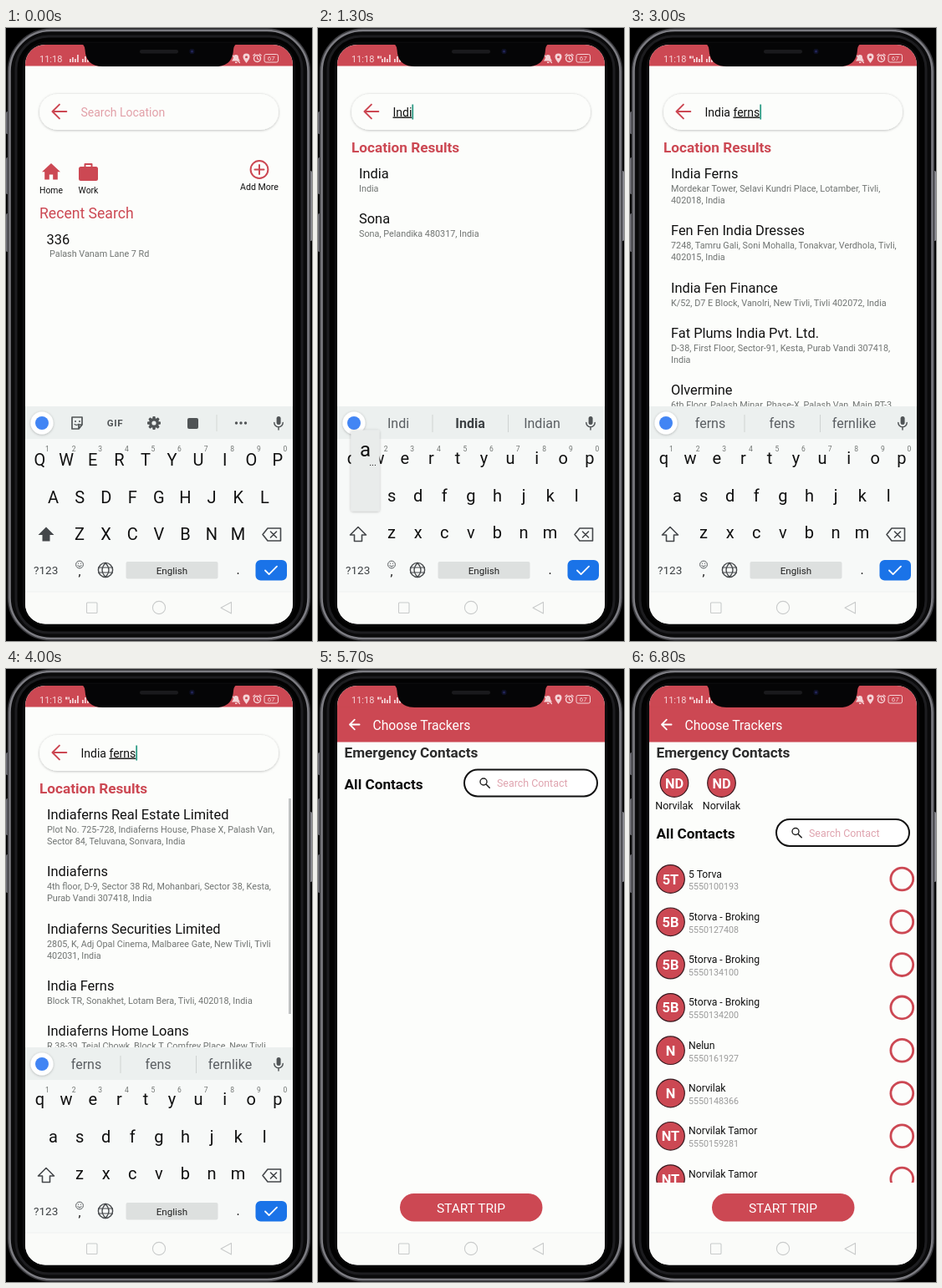
An HTML page for the animation above (6.9 s loop, 366 by 734 pixels).

```html
<!DOCTYPE html>
<html lang="en">
<head>
<meta charset="utf-8">
<title>Location search</title>
<style>
html, body { margin: 0; width: 100%; height: 100%; overflow: hidden; background: #000; }
svg { display: block; width: 366px; height: 734px; font-family: Roboto, Arial, sans-serif; }
#typed { white-space: pre; }
.u { text-decoration: underline; }
.line { fill: none; stroke-linecap: round; stroke-linejoin: round; }
</style>
</head>
<body>
<svg id="stage" viewBox="0 0 366 734"></svg>
<script>
const LOOP = 6900, STEP = 100;
const RED = '#cc4853', INK = '#111', GREY = '#707472', PAPER = '#fcfdfb', ICON = '#505456';

// Markup helpers
const txt = (x, y, s, size, c = INK, more = '') =>
  `<text x="${x}" y="${y}" font-size="${size}" fill="${c}" ${more}>${s}</text>`;
const mid = (x, y, s, size, c, more = '') => txt(x, y, s, size, c, `text-anchor="middle" ${more}`);
const bold = (x, y, s, size, c) => txt(x, y, s, size, c, 'font-weight="700"');
const box = (x, y, w, h, r, c, more = '') =>
  `<rect x="${x}" y="${y}" width="${w}" height="${h}" rx="${r}" fill="${c}" ${more}/>`;
const dot = (x, y, r, c, more = '') => `<circle cx="${x}" cy="${y}" r="${r}" fill="${c}" ${more}/>`;
const ring = (x, y, r, c, w) => dot(x, y, r, 'none', `stroke="${c}" stroke-width="${w}"`);
const line = (d, c, w, more = '') => `<path class="line" d="${d}" stroke="${c}" stroke-width="${w}" ${more}/>`;
const fill = (d, c) => `<path d="${d}" fill="${c}"/>`;
const group = (id, body, more = '') => `<g id="${id}" ${more}>${body}</g>`;
const $ = id => document.getElementById(id);

// Places: [title, address line, second line]
const nearby = [
  ['India', 'India'],
  ['Sona', 'Sona, Pelandika 480317, India']
];
const firstHits = [
  ['India Ferns', 'Mordekar Tower, Selavi Kundri Place, Lotamber, Tivli,', '402018, India'],
  ['Fen Fen India Dresses', '7248, Tamru Gali, Soni Mohalla, Tonakvar, Verdhola, Tivli,', '402015, India'],
  ['India Fen Finance', 'K/52, D7 E Block, Vanolri, New Tivli, Tivli 402072, India'],
  ['Fat Plums India Pvt. Ltd.', 'D-38, First Floor, Sector-91, Kesta, Purab Vandi 307418,', 'India'],
  ['Olvermine', '6th Floor, Palash Minar, Phase-X, Palash Van, Main RT-3,']
];
const finalHits = [
  ['Indiaferns Real Estate Limited', 'Plot No. 725-728, Indiaferns House, Phase X, Palash Van,', 'Sector 84, Teluvana, Sonvara, India'],
  ['Indiaferns', '4th floor, D-9, Sector 38 Rd, Mohanbari, Sector 38, Kesta,', 'Purab Vandi 307418, India'],
  ['Indiaferns Securities Limited', '2805, K, Adj Opal Cinema, Malbaree Gate, New Tivli, Tivli', '402031, India'],
  ['India Ferns', 'Block TR, Sonakhet, Lotam Bera, Tivli, 402018, India'],
  ['Indiaferns Home Loans', 'R 38-39, Tejal Chowk, Block T, Comfrey Place, New Tivli,']
];

// Contacts: [initials, name, number]
const contacts = [
  ['5T', '5 Torva', '5550100193'],
  ['5B', '5torva - Broking', '5550127408'],
  ['5B', '5torva - Broking', '5550134100'],
  ['5B', '5torva - Broking', '5550134200'],
  ['N', 'Nelun', '5550161927'],
  ['N', 'Norvilak', '5550148366'],
  ['NT', 'Norvilak Tamor', '5550159281'],
  ['NT', 'Norvilak Tamor', '5550172604']
];

// Keystrokes: [character, press, release]
const strokes = [
  ['I', 400, 500], ['n', 600, 700], ['d', 800, 900], ['i', 1000, 1100], ['a', 1200, 1400],
  [' ', 1400, 1600], ['f', 1700, 1800], ['e', 1900, 2000], ['r', 2100, 2200],
  ['n', 2300, 2400], ['s', 2500, 2600]
];
const hints = ['I It In', 'In Is Inn', 'Ind India Indian', 'Indi India Indian', 'India Indian Indies',
  'and is has', 'f for from', 'fe few feel', 'fer for fern', 'fern fen ferns', 'ferns fens fernlike']
  .map(s => s.split(' '));

// Keyboard
const rows = [
  { keys: 'qwertyuiop', x: 40.5, y: 524 },
  { keys: 'asdfghjkl', x: 56.5, y: 568.5 },
  { keys: 'zxcvbnm', x: 88, y: 613.3 }
];
const PITCH = 31.6;

const letters = caps => rows.map(r => [...r.keys].map((k, i) =>
  mid(r.x + i * PITCH, r.y - (caps ? 0 : 2), caps ? k.toUpperCase() : k, 20, INK)).join('')).join('');

function popup(ch) {
  const k = ch.toLowerCase(), r = rows.find(r => r.keys.includes(k));
  const x = r.x + r.keys.indexOf(k) * PITCH;
  return box(x - 17, r.y - 87, 34, 97, 2, '#e9eceb', 'filter="url(#soft)"') +
    mid(x, r.y - 56, ch, 24, INK) + mid(x + 9, r.y - 45, '...', 11, INK);
}

const gear = Array.from({ length: 8 }, (_, i) =>
  box(175.3, 465, 3.4, 4, 1, ICON, `transform="rotate(${i * 45} 177 473)"`)).join('') +
  ring(177, 473, 4.3, ICON, 3.4);

const tools =
  line('M79 466h12v9l-4 5h-8zM87 480v-5h4', ICON, 1.7) + dot(83, 471, 1, ICON) + dot(88, 471, 1, ICON) +
  line('M82 474.5q3 2 5-.3', ICON, 1.2) +
  mid(130.5, 477, 'GIF', 11.5, ICON, 'font-weight="700" letter-spacing=".6"') + gear +
  box(217, 467, 13, 13, 2, ICON) + box(251.5, 463, 1, 20, 0, '#d3d7d6') +
  [275.5, 281, 286.5].map(x => dot(x, 473, 1.7, ICON)).join('');

const shiftPath = 'M48 597.5l-9.5 9.5h5v7.500h9v-7.500h5z';
const keyboard =
  box(23, 453, 320, 222, 0, '#f7f9f8') + box(23, 453, 320, 39, 0, '#ecf0ef') +
  dot(43, 473, 13.5, '#fff', 'filter="url(#soft)"') + dot(43, 473, 8, '#4285f4') +
  group('tools', tools) + group('hints', '') +
  box(323.6, 465, 5, 10, 2.5, ICON) + line('M320.8 472.5a5.2 5.2 0 0 0 10.4 0M326 478v3', ICON, 1.5) +
  group('caps', letters(true) + fill(shiftPath, '#44474a')) +
  group('lower', letters(false) + line(shiftPath, '#44474a', 1.6)) +
  [...'1234567890'].map((n, i) => mid(49.5 + i * PITCH, 507, n, 8.5, GREY)).join('') +
  line('M313 599h15.500v15h-15.500l-6-7.500zM316.500 603l7 7M323.500 603l-7 7', '#44474a', 1.6) +
  txt(33, 654, '?123', 13.6, '#3c4043') +
  ring(88, 642.5, 4.4, '#55595c', 1) + line('M85.8 643.8q2.2 2.4 4.4 0M86.5 641v.3M89.5 641v.3', '#55595c', 1) +
  mid(88, 656, ',', 15, INK) +
  ring(119, 649, 8.6, '#44474a', 1.4) +
  line('M110.5 646h17M110.5 652h17M119 640.5q-8 8.5 0 17q8-8.5 0-17', '#44474a', 1.2) +
  `<rect id="space" x="143.5" y="639" width="110" height="20.5" rx="2" fill="#dde0df"/>` +
  mid(198.5, 653.5, 'English', 11.6, '#222') + mid(277.5, 654, '.', 16, INK) +
  box(298.5, 637, 37.5, 24.5, 6, '#1a73e8') + line('M310 649.5l4.6 4.6l9.4-9.4', '#fff', 1.8) +
  group('popup', '');

// Search page
const backArrow = (x, y, r, c, w) => line(`M${x + 2 * r} ${y}H${x}M${x + r} ${y - r}L${x} ${y}l${r} ${r}`, c, w);

const recent =
  fill('M54 162l-11 10.2h3.2v9.3h5.6v-6h4.4v6h5.6v-9.3h3.2z', RED) +
  box(87, 166, 23, 17, 2.5, RED) + line('M94.5 166v-3h8v3', RED, 2) +
  ring(303, 169.5, 10.4, RED, 2) + line('M297.5 169.5h11M303 164v11', RED, 2) +
  mid(54, 197.5, 'Home', 10.4, INK) + mid(98.5, 197.5, 'Work', 10.4, INK) + mid(303, 194, 'Add More', 10.6, INK) +
  txt(40, 227.5, 'Recent Search', 17.6, RED) +
  txt(48.5, 258.5, '336', 16.4) + txt(52, 274, 'Palash Vanam Lane 7 Rd', 10.8, GREY);

function results(list) {
  let y = 180, out = bold(40, 149, 'Location Results', 17.2, RED);
  for (const [title, ...lines] of list) {
    out += txt(49, y, title, 16.4) + lines.map((s, i) => txt(49, y + 16 + i * 14, s, 10.8, GREY)).join('');
    y += 40 + 14.2 * lines.length;
  }
  return out;
}

const searchPage =
  box(23, 45, 320, 630, 0, PAPER) +
  box(40, 79, 286, 43, 21.5, PAPER, 'filter="url(#soft)"') + backArrow(55.5, 100, 8.4, RED, 2) +
  group('blank', txt(89.5, 105.5, 'Search Location', 14, '#e2a0a8')) +
  `<text id="typed" x="89.5" y="105.5" font-size="14" fill="${INK}"></text>` +
  `<rect id="caret" y="91.5" width="1.8" height="18" fill="#2f9c86"/>` +
  group('recent', recent) + group('nearby', results(nearby)) +
  group('firstHits', results(firstHits)) + group('finalHits', results(finalHits)) +
  `<rect id="bar" x="338" y="155" width="3" height="258" fill="#c2c4c4"/>`;

// Contacts page
const avatar = (x, y, s) => dot(x, y, 16.8, RED, 'stroke="#3a1a20" stroke-width="1.2"') +
  mid(x, y + 6, s, 16.4, '#fff', 'font-weight="700"');

const contactRow = ([tag, name, number], i) => {
  const y = 251.5 + i * 51.3;
  return avatar(48.5, y, tag) + txt(70, y - 2, name, 12.2) + txt(70, y + 12.8, number, 10.7, '#9a9a9a') +
    ring(325.3, y, 13.4, RED, 2.8);
};

const contactPage =
  group('body',
    box(23, 45, 320, 640, 0, PAPER) +
    bold(31.5, 106, 'Emergency Contacts', 17.2, '#2b2b2b') +
    group('finder', bold(31.5, 143.5, 'All Contacts', 17.2, '#0c0c0c') +
      box(175, 120.5, 159, 32, 16, '#fff', 'stroke="#111" stroke-width="2"') +
      ring(198, 135, 4, '#222', 1.4) + line('M201 138l4.2 4.2', '#222', 1.6) +
      txt(214, 141, 'Search Contact', 12.4, '#dfa3ae')) +
    group('people',
      [53, 109.5].map(x => avatar(x, 136.5, 'ND') + mid(x, 168, 'Norvilak', 12.4)).join('') +
      `<g clip-path="url(#listClip)">${contacts.map(contactRow).join('')}</g>`) +
    box(98, 628, 170.5, 33.5, 16.7, RED) + mid(183, 650.8, 'START TRIP', 15.5, '#fff')) +
  group('header', box(23, 45, 320, 42.5, 0, RED) + backArrow(38, 66.5, 5.8, '#fff', 1.8) +
    txt(65.5, 72.8, 'Choose Trackers', 15.7, '#fff'));

// Phone
const pale = '#f5d3d6';
const status =
  box(23, 20, 320, 25.5, 0, RED) + txt(40, 40.5, '11:18', 11, pale) +
  group('tick', box(71, 33.5, 2.5, 3, 0, pale) + box(74.5, 33.5, 1.5, 3, 0, pale)) +
  [[76, 4], [79, 6], [82, 4], [85, 9], [91, 4], [94, 7], [97, 3]].map(([x, h]) => box(x, 41 - h, 1.8, h, 0, pale)).join('') +
  fill('M270 39.5q2-2 2-4.5a3 3 0 0 1 6 0q0 2.5 2 4.5zM274 40.5h2.5v1.5h-2.5z', pale) +
  line('M270 32l9.5 9.5', pale, 1.2) +
  fill('M287.5 42q-4-5-4-7.5a4 4 0 0 1 8 0q0 2.5-4 7.5z', pale) + dot(287.5, 34.8, 1.5, RED) +
  ring(300.5, 36.5, 4, pale, 1.5) + line('M300.5 34.5v2.3l1.7.9M295.8 32.8l2-1.6M305.2 32.8l-2-1.6', pale, 1.2) +
  box(309, 31.5, 16.5, 9.5, 2, 'none', `stroke="${pale}"`) + mid(317.2, 39.2, '67', 8, pale);

const nav = box(23, 675, 320, 40, 0, '#fafbf9') + box(23, 674.5, 320, 1, 0, '#f0f2f1') +
  box(96.5, 688, 12.5, 12.5, 1, 'none', 'stroke="#c9cbcb" stroke-width="1.1"') +
  ring(183, 694, 7.6, '#c9cbcb', 1.1) + line('M269.5 687.5v13.500l-12.500-6.750z', '#c9cbcb', 1.1);

const shell =
  [[100, 27], [155, 44], [222, 46]].map(([y, h]) => box(0, y, 4, h, 1.5, '#6d6d74')).join('') +
  box(362, 171, 4, 84, 1.5, '#8c8c93') +
  box(2.5, 1, 361, 732, 51, '#0a0a0b', 'stroke="#3c3c40" stroke-width="1.5"') +
  box(4.5, 3, 357, 728, 49, 'none', 'stroke="#7c7c82" stroke-width="2.6"') +
  box(12, 10, 342, 714, 39, '#020202', 'stroke="#1d1d20" stroke-width="3"') +
  box(19.5, 16.5, 327, 700, 30, '#0b0b0c');

const notch = fill('M88 18q6 1 6.5 8q1 20 21 20h135.500q20 0 21-20q.5-7 6.500-8z', '#050506') +
  box(160, 26, 46, 4.5, 2.2, '#1a1a1d') + dot(222.5, 28, 3.2, '#0d0f22') + dot(222.5, 28, 1.5, '#23265a');

$('stage').innerHTML = `<defs>
  <clipPath id="screenClip"><rect x="23" y="20" width="320" height="693.5" rx="24"/></clipPath>
  <clipPath id="workClip"><rect x="23" y="45" width="320" height="630"/></clipPath>
  <clipPath id="listClip"><rect x="23" y="220" width="320" height="395"/></clipPath>
  <filter id="soft" x="-20%" y="-30%" width="140%" height="160%">
    <feDropShadow dx="0" dy=".6" stdDeviation="1.6" flood-color="#000" flood-opacity=".28"/></filter>
  </defs>` + box(0, 0, 366, 734, 0, '#000') + shell +
  `<g clip-path="url(#screenClip)">${box(23, 20, 320, 694, 0, PAPER)}
    <g clip-path="url(#workClip)">${searchPage}${group('contactPage', contactPage)}${group('keyboard', keyboard)}</g>
    ${status}${nav}</g>` + notch;

// Motion
const OPEN = 4900, LOADED = 5900;
const pageSteps = [[4800, 60, 0], [4900, 26, .25], [5000, 7, .65], [5100, 2, 1], [5200, 0, 1]];
const keySteps = [[4900, 0], [5000, 1], [5100, 24], [5200, 110], [5300, 224]];

function at(steps, t, col) {
  const i = steps.findIndex(s => s[0] > t);
  if (i < 0) return steps[steps.length - 1][col];
  if (i === 0) return steps[0][col];
  const a = steps[i - 1], b = steps[i];
  return a[col] + (b[col] - a[col]) * (t - a[0]) / (b[0] - a[0]);
}
const show = (id, on) => $(id).setAttribute('display', on ? 'inline' : 'none');
const within = (t, a, b) => t >= a && t < b;
const move = (id, y) => $(id).setAttribute('transform', `translate(0 ${y})`);

function draw(t) {
  const done = strokes.filter(s => t >= s[2]).length;
  const pressed = strokes.find(s => within(t, s[1], s[2]));
  const text = t < OPEN ? strokes.slice(0, done).map(s => s[0]).join('') : '';
  const cut = text.lastIndexOf(' ') + 1;

  $('typed').innerHTML = text && `<tspan>${text.slice(0, cut)}</tspan><tspan class="u">${text.slice(cut)}</tspan>`;
  show('blank', !text);
  show('caret', text && !within(t, 3400, 3700) && !within(t, 4200, 4700));
  $('caret').setAttribute('x', 89.5 + $('typed').getComputedTextLength());

  show('tick', t >= 100);
  show('recent', t < 1000 || t >= OPEN);
  show('nearby', within(t, 1000, 3000));
  show('firstHits', within(t, 3000, 3600));
  show('finalHits', within(t, 3600, OPEN));
  $('bar').setAttribute('opacity', t < 3700 ? 0 : at([[4100, 1], [4400, 0]], t, 1));

  show('tools', !done);
  show('caps', !done);
  show('lower', done);
  $('hints').innerHTML = !done ? '' :
    box(136.5, 463, 1, 21, 0, '#cfd3d2') + box(227, 463, 1, 21, 0, '#cfd3d2') +
    hints[done - 1].map((w, i) => mid(96 + i * 86, 479, w, 16, i === 1 && done < 6 ? '#3c4043' : '#5a5e62',
      i === 1 && done < 6 ? 'font-weight="700"' : '')).join('');
  $('popup').innerHTML = pressed && pressed[0] !== ' ' ? popup(pressed[0]) : '';
  $('space').setAttribute('fill', pressed && pressed[0] === ' ' ? '#c5c9c8' : '#dde0df');
  move('keyboard', at(keySteps, t, 1));

  const alpha = at(pageSteps, t, 2);
  show('contactPage', t >= OPEN);
  move('contactPage', at(pageSteps, t, 1));
  $('body').setAttribute('opacity', alpha);
  $('header').setAttribute('opacity', Math.min(1, alpha * 1.4));
  show('people', t >= LOADED);
  move('finder', t >= LOADED ? 59.5 : 0);
}

const start = performance.now();
let last = -1;
function tick() {
  const t = Math.floor(((performance.now() - start) % LOOP) / STEP) * STEP;
  if (t !== last) draw(last = t);
  requestAnimationFrame(tick);
}
tick();
</script>
</body>
</html>
```
